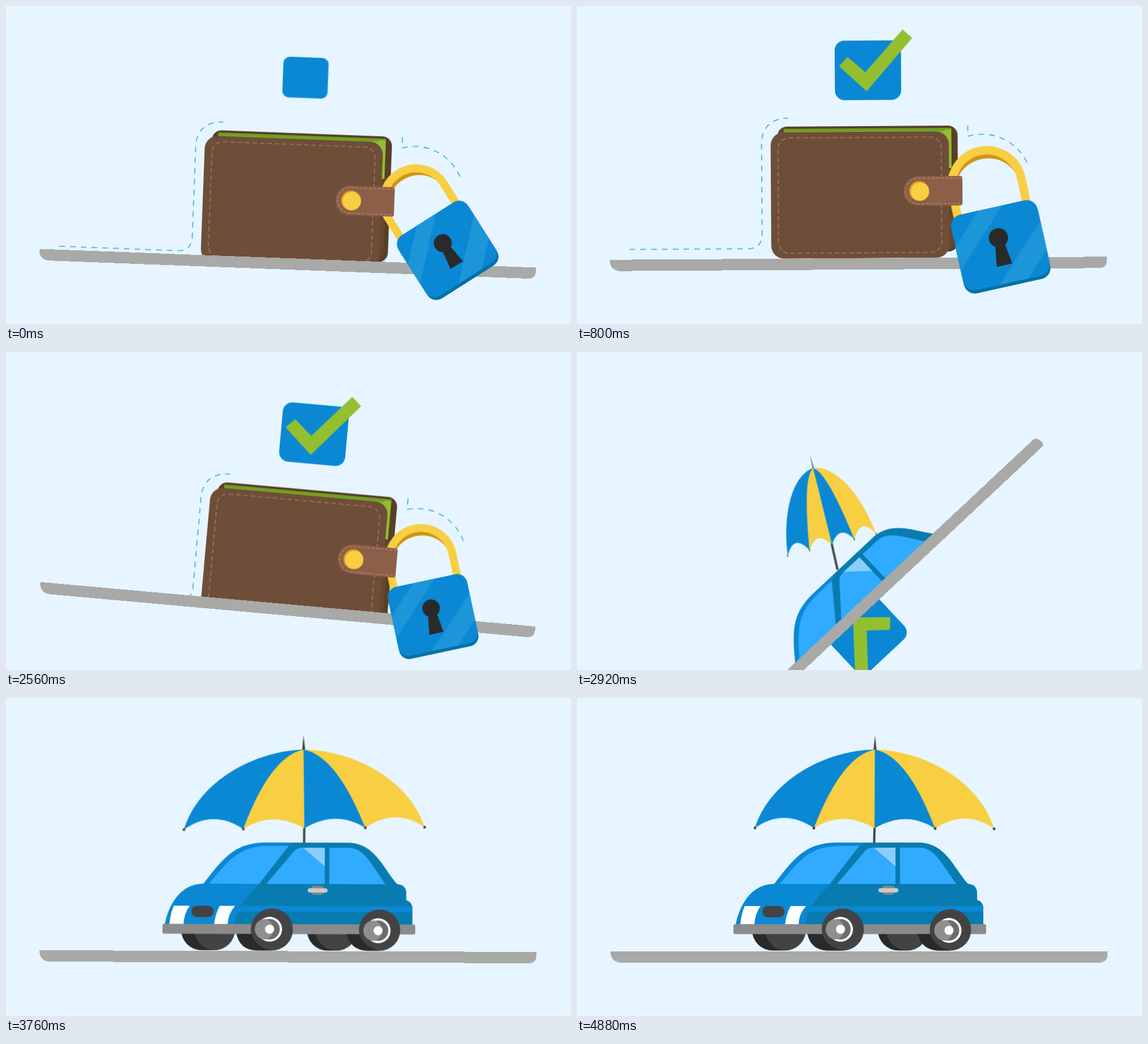
These frames come from a looping animation (997x561 px, 4920 ms). An HTML page without scripts:

```html
<!DOCTYPE html>
<html lang="en">
<head>
<meta charset="utf-8">
<title>Wallet and car protection</title>
<style>
html, body { margin: 0; width: 100%; height: 100%; overflow: hidden; background: #e6f5ff; }
svg { display: block; width: 100vw; height: 100vh; }

.rotor, .sink, .swing, .box, .tick, .shelf, .rise, .lean, .open {
  animation: 4920ms linear infinite;
}
.rotor { transform-origin: 497px 455.75px; animation-name: rotor; }
.sink { animation-name: sink; }
.swing { transform-origin: 720px 323px; animation-name: swing; }
.box { transform-origin: 515.5px 113.5px; animation-name: box; }
.tick { transform-origin: 527px 97px; animation-name: tick; }
.shelf { fill: #a9a9a8; animation-name: shelf; }
.rise { animation-name: rise; }
.lean { transform-origin: 525px 252px; animation-name: lean; }
.open { transform-origin: 525px 0; animation-name: open; }

/* the whole seesaw turns half a circle, overshoots and settles */
@keyframes rotor {
  0% { transform: rotate(2.16deg); }
  8.13% { transform: rotate(-.65deg); animation-timing-function: ease-out; }
  10.98% { transform: rotate(-1.2deg); animation-timing-function: ease-in-out; }
  19.51% { transform: rotate(0deg); }
  48.58% { transform: rotate(0deg); animation-timing-function: cubic-bezier(.32, 0, .67, 0); }
  57.72% { transform: rotate(90deg); }
  59.35% { transform: rotate(136.3deg); animation-timing-function: cubic-bezier(.25, .59, .6, .92); }
  62.6% { transform: rotate(177deg); animation-timing-function: ease-out; }
  67.48% { transform: rotate(183.2deg); }
  68.29% { transform: rotate(183.07deg); }
  70.73% { transform: rotate(182.16deg); }
  78.86% { transform: rotate(179.35deg); animation-timing-function: ease-out; }
  81.3% { transform: rotate(178.8deg); animation-timing-function: ease-in-out; }
  89.43%, 100% { transform: rotate(180deg); }
}
@keyframes sink {
  0% { transform: translateY(12px); animation-timing-function: ease-out; }
  4%, 49.6% { transform: none; animation-timing-function: ease-in; }
  59.35% { transform: translateY(302px); }
  62%, 100% { transform: translateY(420px); }
}
@keyframes swing {
  0% { transform: translate(-2.5px, 6.5px) rotate(-34.5deg) scale(.93); animation-timing-function: ease-out; }
  7.3% { transform: translate(0, 0) rotate(-53.3deg) scale(1); }
  8.13% { transform: rotate(-52.7deg); animation-timing-function: ease-in-out; }
  16.7% { transform: rotate(-12deg); animation-timing-function: ease-in-out; }
  22% { transform: rotate(-16deg); animation-timing-function: ease-in-out; }
  25%, 50.8% { transform: rotate(-15.5deg) scale(1); animation-timing-function: ease-in; }
  56.1%, 100% { transform: rotate(-35deg) scale(0); }
}
@keyframes box {
  0% { transform: translateX(.6px) scale(.68); animation-timing-function: ease-out; }
  5%, 100% { transform: none; }
}
@keyframes tick {
  0%, 1.6% { transform: scale(0); animation-timing-function: ease-out; }
  6.5% { transform: scale(1.13); }
  8.13% { transform: scale(1.07); animation-timing-function: ease-out; }
  11.4%, 100% { transform: none; }
}
/* the rounded edge swaps sides while turning */
@keyframes shelf {
  0%, 56% { d: path("M58 445Q58 445 58 445L935 445Q935 445 935 445L935 451Q935 465 921 465L78 465Q58 465 58 445Z"); }
  63%, 100% { d: path("M58 459Q58 445 72 445L915 445Q935 445 935 465L935 465Q935 465 935 465L58 465Q58 465 58 459Z"); }
}
@keyframes rise {
  0%, 55.28% { transform: translateY(200px); animation-timing-function: ease-in; }
  59.35% { transform: translateY(125px); animation-timing-function: cubic-bezier(.2, .6, .4, 1); }
  68.29% { transform: translateY(3px); }
  70.73%, 100% { transform: none; }
}
@keyframes lean {
  0%, 53.66% { transform: translate(6px, 400px) rotate(29.4deg); }
  59.35% { transform: translate(6px, 107px) rotate(29.4deg); animation-timing-function: cubic-bezier(.2, .6, .5, .95); }
  68.29% { transform: translate(0, -4px) rotate(13.7deg); animation-timing-function: ease-out; }
  74% { transform: translate(0, 0) rotate(-2deg); animation-timing-function: ease-in-out; }
  79% { transform: translate(2px, 0) rotate(.6deg); animation-timing-function: ease-in-out; }
  87% { transform: translate(3px, 0) rotate(.1deg); animation-timing-function: ease-in-out; }
  99%, 100% { transform: translate(0, 0) rotate(.2deg); }
}
@keyframes open {
  0%, 53.66% { transform: scaleX(.2); }
  59.35% { transform: scaleX(.38); }
  68.29% { transform: scaleX(.666); animation-timing-function: ease-out; }
  74% { transform: scaleX(1.02); animation-timing-function: ease-in-out; }
  78%, 100% { transform: none; }
}

.blue { fill: #0a88d4; }
.deep { fill: #087cb0; }
.glass { fill: #31abff; }
.yellow { fill: #f8ce42; }
.green { fill: #93bf30; }
.tyre { fill: #434343; }
.shade { fill: #2a2a2a; }
.seam { fill: none; stroke: #a9795f; stroke-width: 1.6; stroke-dasharray: 8 5; }
.trail { fill: none; stroke: #2ea6de; stroke-width: 1.6; stroke-dasharray: 10 9; }
</style>
</head>
<body>
<svg viewBox="0 0 997 561" preserveAspectRatio="none">
  <defs>
    <clipPath id="above"><rect x="-200" y="-400" width="1400" height="856"/></clipPath>
    <clipPath id="lockBody"><rect x="647.5" y="359" width="156" height="136" rx="20"/></clipPath>
    <g id="hub">
      <circle r="22" fill="#fff"/>
      <circle r="18" fill="#6c6c6c"/>
      <path d="M-4 -17.5A18 18 0 1 0 -4 17.5A20 20 0 0 0 -4 -17.5Z" fill="#8f8f8f"/>
      <circle r="8" fill="#fff"/>
    </g>
  </defs>

  <g class="rotor">
    <!-- car side -->
    <g transform="rotate(180 497 455.75)"><g clip-path="url(#above)">
      <g class="lean">
        <path d="M525 226L524 275" stroke="#444" stroke-width="4"/>
        <g class="open">
          <path class="tyre" d="M522.5 92L525.3 66L528 92Z"/>
          <path class="blue" d="M525 91C440 92 340 145 314 230Q365 194 418 230L525 110Z"/>
          <path class="yellow" d="M525 91C440 92 340 145 314 230Q365 194 418 230L525 110Z" transform="matrix(-1 0 0 1 1050 0)"/>
          <path class="yellow" d="M525 91C480 100 446 158 418 230Q470 197 525 230Z"/>
          <path class="blue" d="M525 91C570 100 604 158 632 230Q580 197 525 230Z"/>
          <g class="tyre">
            <circle cx="314" cy="230" r="2.4"/><circle cx="418" cy="230" r="2.4"/>
            <circle cx="632" cy="230" r="2.4"/><circle cx="736" cy="230" r="2.4"/>
          </g>
        </g>
      </g>

      <g class="rise">
        <g class="shade">
          <rect x="309" y="373" width="94" height="72.5" rx="36"/>
          <rect x="406" y="373" width="94" height="72.5" rx="36"/>
          <rect x="531" y="373" width="88" height="72.5" rx="36"/>
        </g>
        <circle class="tyre" cx="368" cy="409" r="36"/>
        <circle class="tyre" cx="582" cy="409" r="36"/>
        <rect class="shade" x="601" y="373" width="90" height="72.5" rx="36"/>

        <path class="blue" d="M280 400C286 368 306 328 348 328C386 278 406 255 460 255H600C650 255 662 296 690 328Q706 329 706 345V356Q717 360 717 372V400Z"/>
        <path class="deep" d="M403 400C408 366 426 350 447 328L494 266Q503 255 514 255H600C650 255 662 296 690 328Q706 329 706 345V356Q717 360 717 372V400Z"/>
        <path class="blue" d="M411 367H716L717 377H407Z"/>
        <g class="glass">
          <path d="M358 328C398 278 415 262 465 261H498L446 328Z"/>
          <path d="M459 328L509 269Q514 264 524 264H562V328Z"/>
          <path d="M570 264H603C630 264 640 286 669 328H570Z"/>
        </g>
        <path d="M524 264H562V297Z" fill="#8bcdf9"/>
        <path d="M296 367H324Q314 380 313 400H288Q290 380 296 367ZM377 367H404Q391 382 391 400H367Q369 381 377 367Z" fill="#fff"/>
        <rect class="tyre" x="327" y="367" width="39" height="20" rx="9.5"/>
        <rect x="538" y="331" width="23" height="16" rx="6" fill="#858585"/>
        <rect x="532" y="335.5" width="35" height="7.5" rx="3.7" fill="#cbcbcb"/>

        <rect x="276" y="399" width="446" height="17.5" rx="3" fill="#8b8b8b"/>
        <circle class="tyre" cx="469" cy="408.5" r="37.2"/>
        <circle class="tyre" cx="659" cy="409" r="36.5"/>
        <path class="shade" d="M407 416.5H432.5Q441 440 469 445.5H441Q412 444 407 416.5ZM601 416.5H623Q632 440 659 445.5H637Q608 444 601 416.5Z"/>
        <use href="#hub" x="465" y="408"/>
        <use href="#hub" x="656.5" y="410"/>
      </g>
    </g></g>

    <!-- wallet side -->
    <g clip-path="url(#above)"><g class="sink">
      <path class="trail" d="M93 427H303Q327 427 327 400V242C327 212 346 197 374 197"/>
      <path class="trail" d="M691 211V231C733 219 778 238 797 282" stroke-dashoffset="-1"/>
      <g class="box">
        <rect class="blue" x="457" y="61" width="117" height="105" rx="17"/>
        <path class="green tick" d="M577 42L594 57L513 150.5L464.5 106L480 90L511 117Z"/>
      </g>
      <rect x="355" y="212" width="318" height="222" rx="17" fill="#573f2a"/>
      <path d="M640 290H665V412Q665 432 645 434H640Z" fill="#67462f"/>
      <path class="green" d="M366 216H662V287H630V222H366Z"/>
      <path d="M366 216H662V219H650V221.5H366Z" fill="#719f20"/>
      <rect x="343" y="222" width="314.5" height="223" rx="23" fill="#6e4e38"/>
      <rect class="seam" x="356" y="232" width="288" height="203.5" rx="19"/>
    </g></g>

    <path class="shelf" d="M58 445Q58 445 58 445L935 445Q935 445 935 445L935 451Q935 465 921 465L78 465Q58 465 58 445Z"/>

    <g class="sink"><g class="swing">
      <path d="M668 325V319A57 57 0 0 1 782 319V325A57 53.5 0 0 0 668 325Z" fill="#cf9512"/>
      <path d="M663 368V319A62 62 0 0 1 787 319V368" fill="none" stroke="#f8ce42" stroke-width="15"/>
      <rect x="647.5" y="365" width="156" height="136" rx="20" fill="#0670a5"/>
      <g clip-path="url(#lockBody)">
        <rect class="blue" x="647" y="359" width="157" height="136"/>
        <path d="M701 359H744L647 456V413ZM804 400V452L761 495H709Z" fill="#1d95d9"/>
      </g>
      <circle class="shade" cx="725" cy="413.5" r="17"/>
      <path class="shade" d="M717 422H733L739 463H711Z"/>
    </g></g>

    <g clip-path="url(#above)"><g class="sink">
      <path d="M603 301H677Q681 301 681 305V349Q681 353 677 353H603A26 26 0 0 1 603 301Z" fill="#8c5f48"/>
      <path class="seam" d="M680 304.5H603A22.5 22.5 0 0 0 603 349.5H680" style="stroke:#b5866c;stroke-width:1.4;stroke-dasharray:5 3"/>
      <circle cx="604.5" cy="327" r="17.5" fill="#dc9f1e"/>
      <circle class="yellow" cx="606" cy="328" r="16.3"/>
    </g></g>
  </g>
</svg>
</body>
</html>
```
